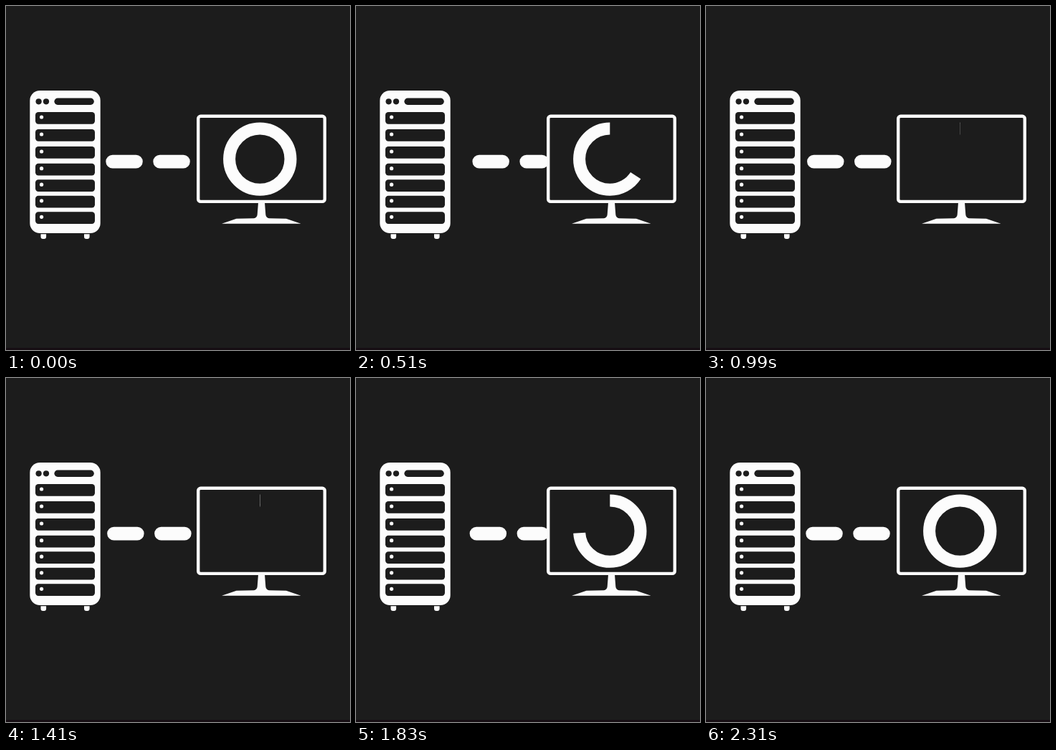
Recreate the animation shown at these times as an HTML page. Size 480x480 px, loop 2.37 s.

```html
<!DOCTYPE html>
<html lang="en">
<head>
<meta charset="utf-8">
<title>Server transfer</title>
<style>
  html, body { margin: 0; width: 100%; height: 100%; overflow: hidden; background: #1c1c1c; }
  svg { display: block; width: 100vw; height: 100vh; }
</style>
</head>
<body>
<svg viewBox="0 0 480 480">
  <rect width="480" height="480" fill="#1c1c1c"/>
  <rect y="477" width="480" height="3" fill="#160e13"/>

  <g id="server" fill="#fcfcfc">
    <rect x="33.3" y="118" width="98.4" height="199" rx="14"/>
    <path d="M48.5 318.3h7.6v3.7a3 3 0 0 1-3 3h-1.6a3 3 0 0 1-3-3z"/>
    <path d="M109 318.3h7.6v3.7a3 3 0 0 1-3 3h-1.6a3 3 0 0 1-3-3z"/>
    <g fill="#1c1c1c">
      <circle cx="45.6" cy="133.3" r="4.1"/>
      <circle cx="56" cy="133.3" r="4.1"/>
      <rect x="67.4" y="128.6" width="55.4" height="9.4" rx="4.7"/>
    </g>
  </g>

  <line id="link" x1="140.6" y1="217.1" x2="259.5" y2="217.1" stroke="#fcfcfc"
        stroke-width="18.8" stroke-linecap="round"/>

  <g id="monitor" fill="#fcfcfc">
    <rect x="268.2" y="153.7" width="176.6" height="119.2" rx="3.5"
          fill="none" stroke="#fcfcfc" stroke-width="4.4"/>
    <path d="M352 274h9l1.3 17q.4 4.5 5 5.3l23.7.5 20.5 7H301l20.5-7 24.2-.5q4.6-.8 5-5.3z"/>
  </g>

  <circle id="ring" cx="354.3" cy="213.6" r="42.7" pathLength="1" fill="none"
          stroke="#fcfcfc" stroke-width="17" transform="rotate(-90 354.3 213.6)"/>
</svg>
<script>
const LOOP = 2370, STEP = 30;
const PITCH = 66, DASH = 32.7;
const LINK_START = 140.6;
const HOME = 148.7, REST = 150.5;   // centre-line start of the first dash at each rest
const SLIVER = 0.0003;

const server = document.getElementById('server');
const link = document.getElementById('link');
const ring = document.getElementById('ring');

function add(tag, attrs) {
  const el = document.createElementNS('http://www.w3.org/2000/svg', tag);
  for (const k in attrs) el.setAttribute(k, attrs[k]);
  server.appendChild(el);
}

for (const y of [155, 179, 203, 226.7, 249.2, 271.8, 294.3]) {
  add('rect', { x: 41, y: y - 7, width: 83, height: 16.7, rx: 4.2, fill: '#1c1c1c' });
  add('circle', { cx: 49.6, cy: y, r: 2.6, fill: '#fcfcfc' });
}

// Symmetric cubic bezier ease (p, 0, 1 - p, 1), very steep in the middle.
function ease(u) {
  if (u <= 0) return 0;
  if (u >= 1) return 1;
  const p = 0.95;
  let lo = 0, hi = 1;
  for (let i = 0; i < 30; i++) {
    const s = (lo + hi) / 2, r = 1 - s;
    const x = 3 * s * r * r * p + 3 * s * s * r * (1 - p) + s * s * s;
    if (x < u) lo = s; else hi = s;
  }
  return lo * lo * (3 - 2 * lo);
}

const move = (t, mid, span) => ease((t - mid) / span + 0.5);

function setArc(from, to) {
  const full = to - from > 0.9995;
  ring.setAttribute('stroke-dasharray', full ? 'none' : (to - from) + ' 2');
  ring.setAttribute('stroke-dashoffset', -from);
}

function draw(ms) {
  const t = Math.floor((ms % LOOP) / STEP) * STEP;
  let x;
  if (t < 1410) {
    setArc(t < 90 ? 0 : Math.min(move(t, 523, 1023), 1 - SLIVER), 1);
    x = HOME + (REST - HOME + PITCH) * move(t, 523, 1023);
  } else {
    setArc(0, move(t, 1804, 887));
    x = REST + (HOME - REST + PITCH) * move(t, 1855, 960);
  }
  const offset = ((LINK_START - x) % PITCH + PITCH) % PITCH;
  link.setAttribute('stroke-dasharray', DASH + ' ' + (PITCH - DASH));
  link.setAttribute('stroke-dashoffset', offset);
}

const start = performance.now();
function tick() {
  draw(performance.now() - start);
  requestAnimationFrame(tick);
}
tick();
</script>
</body>
</html>
```
